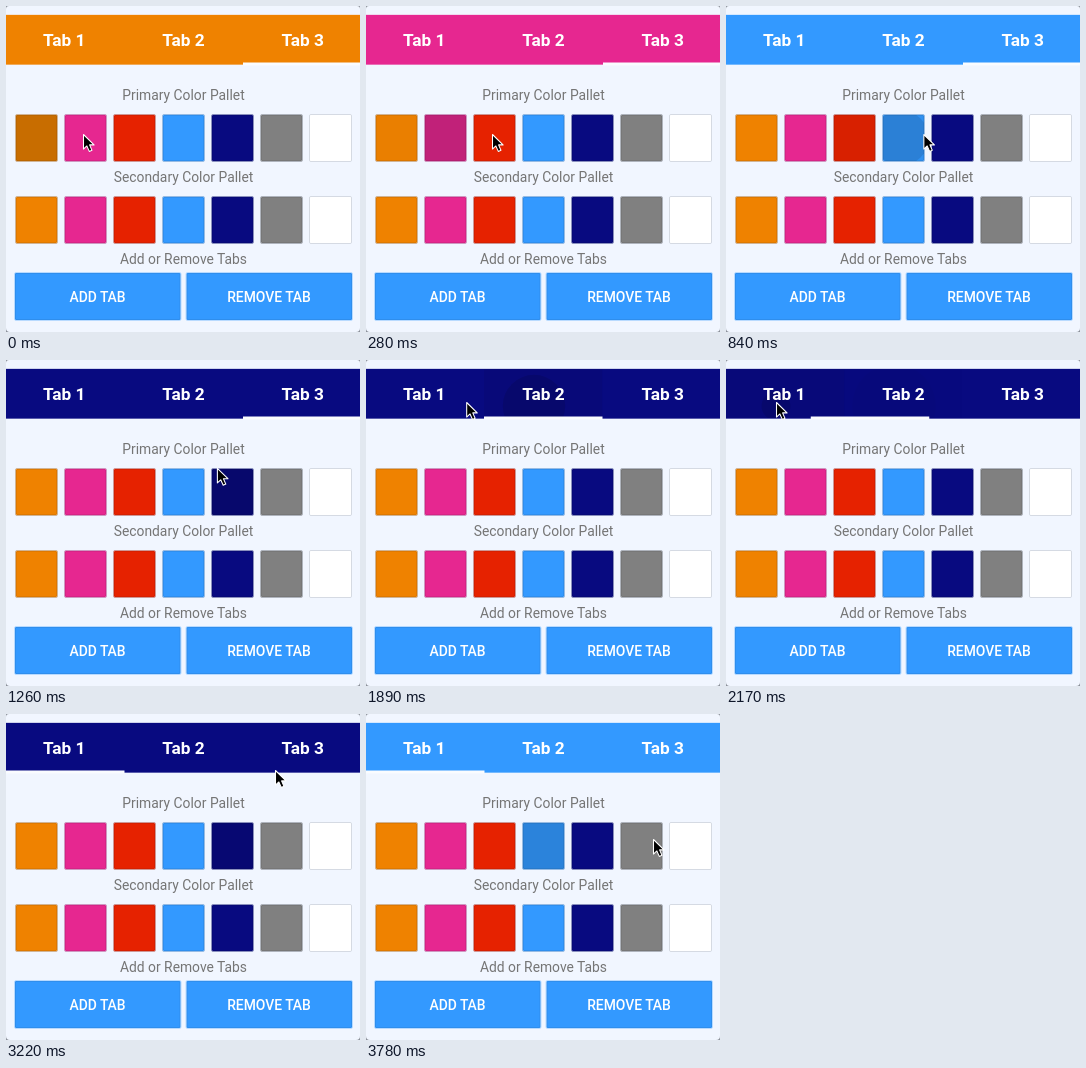
These frames come from a looping animation (354x326 px, 3850 ms). An HTML page:

```html
<!DOCTYPE html>
<html lang="en">
<head>
<meta charset="utf-8">
<title>Tab colors</title>
<style>
html, body { margin: 0; width: 354px; height: 326px; overflow: hidden; background: #f1f6ff; }
svg { display: block; }
text { font-family: Roboto, Arial, sans-serif; text-anchor: middle; }
.tab { font-size: 17.3px; font-weight: 700; fill: #fff; }
.label { font-size: 13.85px; fill: #757575; }
.button { font-size: 13.9px; font-weight: 500; fill: #fff; }
</style>
</head>
<body>
<svg id="stage" width="354" height="326" viewBox="0 0 354 326"></svg>
<script>
const NS = 'http://www.w3.org/2000/svg';
const stage = document.getElementById('stage');
const LOOP = 3850, STEP = 70;
const COLORS = ['#ef8200', '#e62790', '#e62200', '#3399ff', '#080a80', '#808080', '#ffffff'];
const TAB_W = 118.5, SWATCH_W = 41, SWATCH_H = 46;

function set(el, attrs) {
  for (const k in attrs) el.setAttribute(k, attrs[k]);
  return el;
}
function add(tag, attrs, parent = stage) {
  return parent.appendChild(set(document.createElementNS(NS, tag), attrs));
}
function label(cls, x, y, str) {
  add('text', { class: cls, x, y }).textContent = str;
}
const clamp = v => Math.max(0, Math.min(1, v));
const ease = v => v * v * (3 - 2 * v);
const mix = (a, b, k) => a + (b - a) * k;
const tabX = i => Math.floor(TAB_W * i);
const swatchX = i => 10 + 49 * i;

// A filled box with a soft tinted rim and a slightly darker inner edge.
function panel(x, y, width, height, fill) {
  add('rect', {
    x: x - .5, y: y - .5, width: width + 1, height: height + 1, rx: 1.5,
    fill: 'none', stroke: fill, 'stroke-opacity': .3
  });
  add('rect', { x, y, width, height, rx: 1, fill });
  add('rect', {
    x: x + .5, y: y + .5, width: width - 1, height: height - 1, rx: 1,
    fill: 'none', stroke: '#000', 'stroke-opacity': fill === '#ffffff' ? 0 : .07
  });
}

// Pointer stops; a swatch or tab is pressed at its time, a hover only rests there.
const swatch = (time, i) => ({
  time, swatch: i, x: swatchX(i) + 18, y: 128,
  box: { x: swatchX(i), y: 109, width: SWATCH_W, height: SWATCH_H }
});
const tab = (time, i) => ({
  time, tab: i, x: tabX(i) + 50, y: 42,
  box: { x: tabX(i), y: 9, width: TAB_W, height: 49 }
});
const hover = (time, x, y) => ({ time, x, y });
const STOPS = [
  swatch(-240, 0), swatch(70, 1), swatch(400, 2), swatch(660, 3), swatch(1050, 4),
  tab(1680, 1), tab(2100, 0), swatch(2870, 4), hover(3190, 269, 56),
  swatch(3500, 3), hover(LOOP, 287, 125)
];

// A press tints its box while a circle spreads from the pointer, then both fade.
function makeRipple({ time, x, y, box }) {
  const g = add('svg', { ...box, overflow: 'hidden' });
  add('rect', { width: box.width, height: box.height, opacity: .06 }, g);
  const dot = add('circle', { cx: x - box.x, cy: y + 4 - box.y, opacity: .11 }, g);
  return t => {
    const age = t - time;
    const fade = age < 0 ? 0 : clamp((age + 40) / 110) * (1 - clamp((age - 240) / 320));
    set(dot, { r: mix(6, 42, clamp(age / 300)) });
    set(g, { opacity: fade });
  };
}

// Header
const header = add('rect', { x: -1, y: 9, width: 356, height: 49.5, 'stroke-opacity': .3 });

// Palettes
for (const y of [109, 191]) {
  COLORS.forEach((fill, i) => {
    add('rect', {
      x: swatchX(i) - .5, y: y - .5, width: SWATCH_W + 1, height: SWATCH_H + 1, rx: 1.5,
      fill: 'none', stroke: '#c3cad6'
    });
    panel(swatchX(i), y, SWATCH_W, SWATCH_H, fill);
  });
}

const ripples = STOPS.filter(s => s.box).map(makeRipple);
const bar = add('rect', { y: 56.5, width: TAB_W, height: 3, fill: '#fafcff' });
for (let i = 0; i < 3; i++) label('tab', 58.3 + 119.2 * i, 40, 'Tab ' + (i + 1));

['Primary Color Pallet', 'Secondary Color Pallet', 'Add or Remove Tabs']
  .forEach((str, i) => label('label', 177.5, 93.5 + 82.2 * i, str));

// Buttons
['ADD TAB', 'REMOVE TAB'].forEach((str, i) => {
  const x = 9 + 171.5 * i;
  panel(x, 267, 165.5, 47, COLORS[3]);
  label('button', x + 82.5, 296, str);
});

// Rounded window corners
add('path', {
  d: 'M0 0h3Q0 0 0 3zM354 0v3Q354 0 351 0zM0 326v-4Q0 326 4 326zM354 326h-4Q354 326 354 322z',
  fill: '#8b9099'
});

const cursor = add('path', {
  d: 'M0 0V16.5L3.8 13L6.6 19.2L9.6 17.9L6.9 11.8H12Z',
  fill: '#000', stroke: '#fff', 'stroke-width': 1.2, 'stroke-linejoin': 'round'
});

// The pointer rests around each stop and travels at most 350 ms between two.
function pointer(t) {
  let i = 0;
  while (i < STOPS.length - 2 && t >= STOPS[i + 1].time) i++;
  const a = STOPS[i], b = STOPS[i + 1];
  const leave = a.time + 100;
  const travel = Math.min(350, b.time - 120 - leave);
  const k = ease(clamp((t - leave) / travel));
  return [mix(a.x, b.x, k), mix(a.y, b.y, k)];
}

function draw(ms) {
  const t = Math.floor((ms % LOOP) / STEP) * STEP;
  let color, left = tabX(2);
  for (const s of STOPS) {
    if (t < s.time) break;
    if ('swatch' in s) color = COLORS[s.swatch];
    if ('tab' in s) left = mix(left, tabX(s.tab), ease(clamp((t - s.time) / 200)));
  }
  set(header, { fill: color, stroke: color });
  set(bar, { x: left });
  ripples.forEach(update => update(t));
  const [x, y] = pointer(t);
  set(cursor, { transform: `translate(${x + .5} ${y + .5}) scale(.88)` });
}

const start = performance.now();
function tick() {
  draw(performance.now() - start);
  requestAnimationFrame(tick);
}
draw(0);
requestAnimationFrame(tick);
</script>
</body>
</html>
```
